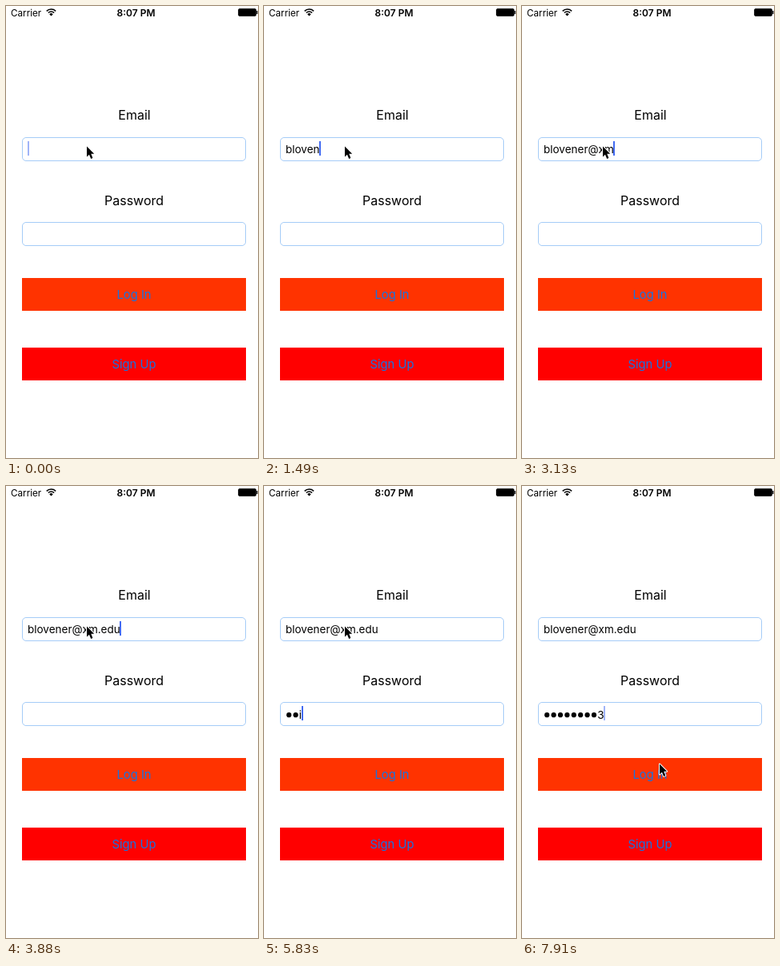
These frames come from a looping animation (315x565 px, 8000 ms). An HTML page with a canvas:

```html
<!DOCTYPE html>
<html lang="en">
<head>
<meta charset="utf-8">
<title>Login form</title>
<style>
  html, body { margin: 0; width: 100%; height: 100%; overflow: hidden; background: #fff; }
  canvas { display: block; width: 315px; height: 565px; }
</style>
</head>
<body>
<canvas id="stage"></canvas>
<script>
const W = 315, H = 565, LOOP = 8000;
const canvas = document.getElementById('stage');
const ctx = canvas.getContext('2d');
const scale = window.devicePixelRatio || 1;
canvas.width = W * scale;
canvas.height = H * scale;

const FAMILY = 'Inter, Roboto, sans-serif';
const BORDER = '#a5ccf8', HINT = '#8fbcf5', LINK = '#1673e0', CARET = '#426bf2';
const LEFT = 27, DOT_STEP = 8.4, FIELD_SIZE = 13.5;

// The screen refreshes in even ticks; all moments below are tick numbers.
const TICK = 149.3, LEAD = 8;
const FOCUS_PASSWORD = 30, POINTER_START = 49, POINTER_END = 53;

// Bursts of typing: the text is spread evenly over `span` ticks.
const emailKeys = [
  { start: 6, span: 7, keys: 'blovener' },
  { start: 18, span: 1, keys: '@' },
  { start: 20, span: 2, keys: 'xm' },
  { start: 24, span: 3, keys: '.edu' },
];
const passwordKeys = [
  { start: 37, span: 3, keys: 'swi' },
  { start: 41, span: 1, keys: 'ms' },
  { start: 45, span: 1, keys: '2' },
  { start: 47, span: 3, keys: '013' },
];

const clamp = v => Math.min(1, Math.max(0, v));
const smooth = u => u * u * (3 - 2 * u);

// Text typed so far and the tick of the last key
function typing(bursts, tick, idleSince) {
  let value = '', last = idleSince;
  for (const { start, span, keys } of bursts) {
    if (tick < start) break;
    value += keys.slice(0, Math.round(keys.length * clamp((tick - start + 1) / span)));
    last = Math.min(tick, start + span - 1);
  }
  return { value, last };
}

// Solid after a key, then a soft blink
function caretAlpha(idle) {
  return idle < 4 ? 1 : clamp(.5 - Math.cos((idle - 5.5) * Math.PI / 3));
}

function text(str, x, y, size, { color = '#000', align = 'left', weight = 400 } = {}) {
  ctx.font = `${weight} ${size}px ${FAMILY}`;
  ctx.fillStyle = color;
  ctx.textAlign = align;
  ctx.fillText(str, x, y);
  return ctx.measureText(str).width;
}

function box(x, y, w, h, color) {
  ctx.fillStyle = color;
  ctx.fillRect(x, y, w, h);
}

function outline(x, y, w, h, radius, color) {
  ctx.beginPath();
  ctx.roundRect(x + .5, y + .5, w - 1, h - 1, radius);
  ctx.fillStyle = '#fff';
  ctx.fill();
  ctx.strokeStyle = color;
  ctx.lineWidth = 1;
  ctx.stroke();
}

function statusBar() {
  text('Carrier', 6, 12.5, 11.7);
  text('8:07 PM', 162.5, 12.5, 12, { align: 'center', weight: 600 });
  const up = -Math.PI / 2, spread = .8;
  ctx.strokeStyle = '#000';
  ctx.lineWidth = 1.6;
  for (const r of [8, 5]) {
    ctx.beginPath();
    ctx.arc(56.5, 12, r, up - spread, up + spread);
    ctx.stroke();
  }
  ctx.fillStyle = '#000';
  ctx.beginPath();
  ctx.moveTo(56.5, 12.5);
  ctx.arc(56.5, 12.5, 3.2, up - spread, up + spread);
  ctx.fill();
  outline(290, 3, 23, 10, 1.5, '#222');
  box(291, 4, 21, 8, '#000');
  box(313, 6, 1.5, 4, '#222');
}

function button(label, y, color) {
  box(20, y, 280, 41, color);
  text(label, 160, y + 26, 14.8, { color: LINK, align: 'center' });
}

function suggestion(width) {
  box(24, 168, width + 3, 20, '#aecbf7');
  outline(24, 188, 79, 23, [0, 11, 11, 0], BORDER);
  text('slang we', LEFT, 204.5, FIELD_SIZE, { color: HINT });
  ctx.strokeStyle = HINT;
  ctx.beginPath();
  ctx.moveTo(87, 195.5);
  ctx.lineTo(95, 203.5);
  ctx.moveTo(95, 195.5);
  ctx.lineTo(87, 203.5);
  ctx.stroke();
}

// All characters but the newest become dots; returns the text end
function password(value) {
  const hidden = Math.max(0, value.length - 1);
  ctx.fillStyle = '#000';
  for (let i = 0; i < hidden; i++) {
    ctx.beginPath();
    ctx.arc(LEFT + (i + .5) * DOT_STEP, 286.2, 3.1, 0, Math.PI * 2);
    ctx.fill();
  }
  const x = LEFT + hidden * DOT_STEP;
  return x + text(value.slice(hidden), x, 290.5, FIELD_SIZE);
}

function pointer(tick) {
  const p = smooth(clamp((tick - POINTER_START) / (POINTER_END - POINTER_START)));
  ctx.save();
  ctx.translate(101 + 71 * p, 175.5 + 172 * p);
  ctx.beginPath();
  for (const [x, y] of [[0, 0], [0, 13], [3, 10.2], [5.2, 15.4], [7.4, 14.4], [5.3, 9.3], [9.2, 9.3]]) ctx.lineTo(x, y);
  ctx.closePath();
  ctx.lineJoin = 'round';
  ctx.lineWidth = 2;
  ctx.strokeStyle = '#fff';
  ctx.stroke();
  ctx.fillStyle = '#000';
  ctx.fill();
  ctx.restore();
}

function draw(tick) {
  ctx.setTransform(scale, 0, 0, scale, 0, 0);
  box(0, 0, W, H, '#fff');
  statusBar();
  text('Email', 160.5, 142, 16, { align: 'center' });
  text('Password', 160, 249, 16, { align: 'center' });
  outline(20, 164, 280, 30, 4.5, BORDER);
  outline(20, 270, 280, 30, 4.5, BORDER);
  button('Log In', 340, '#ff3300');
  button('Sign Up', 427, '#ff0000');

  const email = typing(emailKeys, tick, -4);
  const secret = typing(passwordKeys, tick, FOCUS_PASSWORD - 1);
  ctx.font = `400 ${FIELD_SIZE}px ${FAMILY}`;
  const emailWidth = ctx.measureText(email.value).width;
  if (tick >= 12 && tick < 18) suggestion(emailWidth);
  text(email.value, LEFT, 183.5, FIELD_SIZE);
  const secretEnd = password(secret.value);

  const inEmail = tick < FOCUS_PASSWORD;
  const end = inEmail ? LEFT + emailWidth : secretEnd;
  ctx.globalAlpha = caretAlpha(tick - (inEmail ? email : secret).last);
  box(Math.floor(end), inEmail ? 169 : 275, 2, 18, CARET);
  ctx.globalAlpha = 1;
  pointer(tick);
}

function animate() {
  draw(Math.floor((performance.now() % LOOP + LEAD) / TICK));
  requestAnimationFrame(animate);
}
animate();
</script>
</body>
</html>
```
